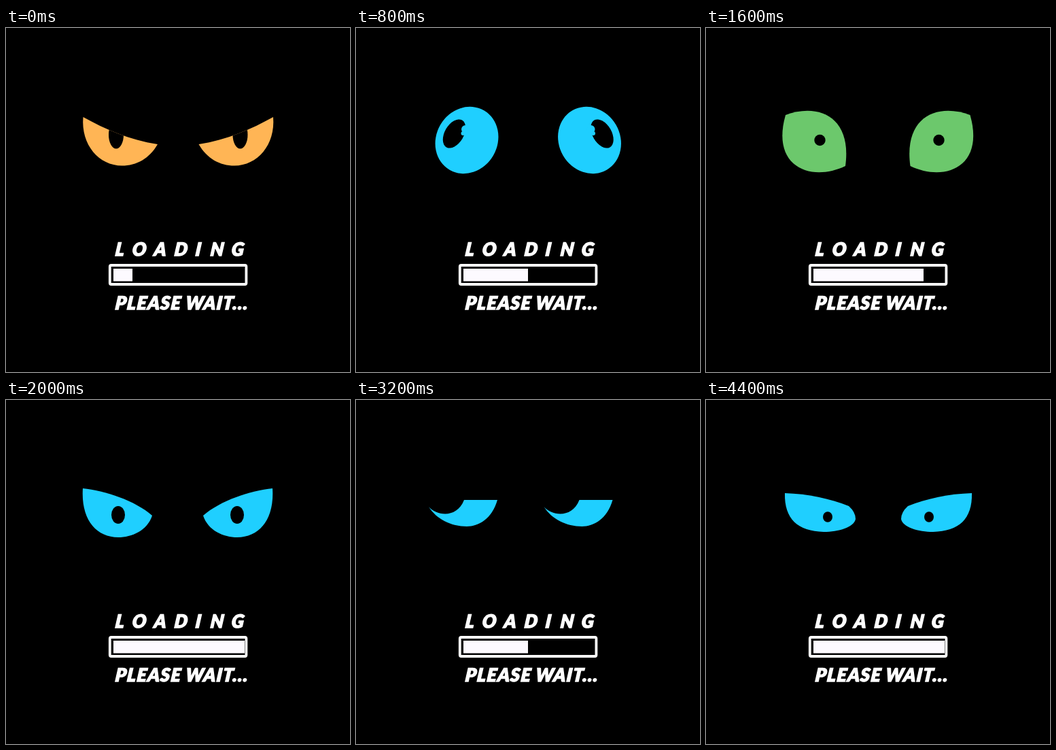
Write an HTML page that moves like this. It is 506x506 px and loops after 4.8 s.

```html
<!DOCTYPE html>
<html lang="en">
<head>
<meta charset="utf-8">
<title>Loading</title>
<style>
html, body { margin: 0; width: 100%; height: 100%; overflow: hidden; background: #000; }
svg { display: block; width: 100vw; height: 100vh; }
text { font: italic 900 27px Lato, "Open Sans", sans-serif; fill: #fff; stroke: #fff; stroke-width: 1.3; }
</style>
</head>
<body>
<svg viewBox="0 0 506 506">
  <defs><clipPath id="lid"><path id="lidPath"/></clipPath></defs>
  <rect width="506" height="506" fill="#000"/>
  <g id="eyes"></g>
  <g transform="translate(160 335.3) skewX(-6)">
    <text x="0 25 57 87 118 140 171">LOADING</text>
  </g>
  <rect x="152.8" y="349" width="200.6" height="28" rx="2" fill="none" stroke="#fff" stroke-width="3.8"/>
  <rect id="bar" x="158" y="354" height="18.5" fill="#fdfaff"/>
  <g transform="translate(160 413.6) skewX(-6)" letter-spacing="1.2">
    <text>PLEASE</text>
    <text x="103.5">WAIT...</text>
  </g>
</svg>
<script>
const STEP = 400;
const ORANGE = '#ffb555', GREEN = '#6cc86c', BLUE = '#1fcfff';
const $ = id => document.getElementById(id);

const oval = (x, y, rx, ry = rx, tilt = 0, extra = '') =>
  `<ellipse cx="${x}" cy="${y}" rx="${rx}" ry="${ry}" transform="rotate(${tilt} ${x} ${y})" ${extra}/>`;
const shine = (x, y, r, extra = '') => oval(x, y, r, r, 0, `fill="currentColor" ${extra}`);

// Closed outline of an ellipse, optionally tilted
const ring = (x, y, rx, ry, tilt = 0) => {
  const a = tilt * Math.PI / 180, dx = rx * Math.cos(a), dy = rx * Math.sin(a);
  const arc = s => `A${rx} ${ry} ${tilt} 1 1 ${x + s * dx} ${y + s * dy}`;
  return `M${x - dx} ${y - dy}${arc(1)}${arc(-1)}Z`;
};

const mirror = sum => `matrix(-1 0 0 1 ${sum} 0)`;
const shift = dx => `translate(${dx} 0)`;

const rim = 'stroke="#26352a" stroke-width="2"';
const leaf = 'M117 128C165 110 215 130 205 203C155 227 95 205 117 128Z';
const angry = {
  shape: 'M113.5 131C146 149 181 164.5 223 171C211 192 192 202.5 170.5 202.5C137 202.5 110 172 113.5 131Z',
  pupil: oval(162, 157, 11, 20.5), right: mirror(506.5)
};

const poses = [
  { ...angry, colors: [ORANGE] },
  { shape: leaf, pupil: oval(163, 165, 8, 25), right: mirror(504), colors: [GREEN] },
  { shape: ring(163, 165, 45, 50.5, 30),
    pupil: oval(144.5, 155.5, 14, 23, 30) + shine(161, 149, 6) + shine(157.5, 155, 3),
    right: mirror(506.5), colors: [BLUE] },
  { shape: 'M112 157C135 136 180 128 207 146C217 185 190 210 160 210C130 210 112 185 112 157Z',
    pupil: oval(162, 166, 15, 18), right: mirror(503), colors: [ORANGE] },
  { shape: leaf, pupil: oval(167.5, 165, 8.2), nudge: -4.5, right: mirror(505.5), colors: [GREEN] },
  { shape: 'M113 130C145 133 190 148 215 170C208 192 185 202 165 202C132 202 110 175 113 130Z',
    pupil: oval(165, 169, 10, 13), right: mirror(505), colors: [BLUE] },
  { ...angry, colors: [ORANGE, BLUE] },
  { shape: 'M114 147H208C208 176 186 195 161 195C136 195 114 176 114 147Z',
    pupil: oval(161, 152, 12, 18), right: mirror(504), colors: [GREEN] },
  { shape: 'M107 157C118 170 148 175 159 147H208C200 175 180 186 163 186C140 186 118 175 107 157Z',
    pupil: '', right: shift(169.5), colors: [BLUE] },
  { shape: ring(160.5, 161, 47, 47), pupil: oval(145, 160, 16, 21) + shine(153, 151, 6),
    right: shift(169.5), colors: [ORANGE] },
  { shape: 'M121 121C175 128 208 160 211 205C165 220 95 212 121 121Z',
    pupil: oval(169, 152, 28, 28, 0, rim) + shine(151, 147, 12, rim) + shine(147, 147, 10.5),
    right: mirror(505.5), colors: [GREEN] },
  { shape: 'M116 137C150 138 182 145 210 156Q220 165 220 175C218 187 195 194 173 194C135 193 115 175 116 137Z',
    pupil: oval(179, 172, 7, 7.8), right: mirror(507), colors: [BLUE] }
];

function eye(pose, color, place, nudge = 0) {
  return `<g transform="${place}" color="${color}"><path d="${pose.shape}" fill="${color}"/>` +
    `<g clip-path="url(#lid)"><g transform="${shift(nudge)}">${pose.pupil}</g></g></g>`;
}

let shown = -1;
function draw(ms) {
  const n = Math.floor(ms / STEP) % poses.length;
  if (n === shown) return;
  shown = n;
  const pose = poses[n], [left, right = left] = pose.colors;
  $('lidPath').setAttribute('d', pose.shape);
  $('eyes').innerHTML = eye(pose, left, shift(0)) + eye(pose, right, pose.right, pose.nudge);
  $('bar').setAttribute('width', Math.min(28 + 33.5 * (n % 6), 193));
}

const start = performance.now();
function tick() {
  draw(performance.now() - start);
  requestAnimationFrame(tick);
}
tick();
</script>
</body>
</html>
```
